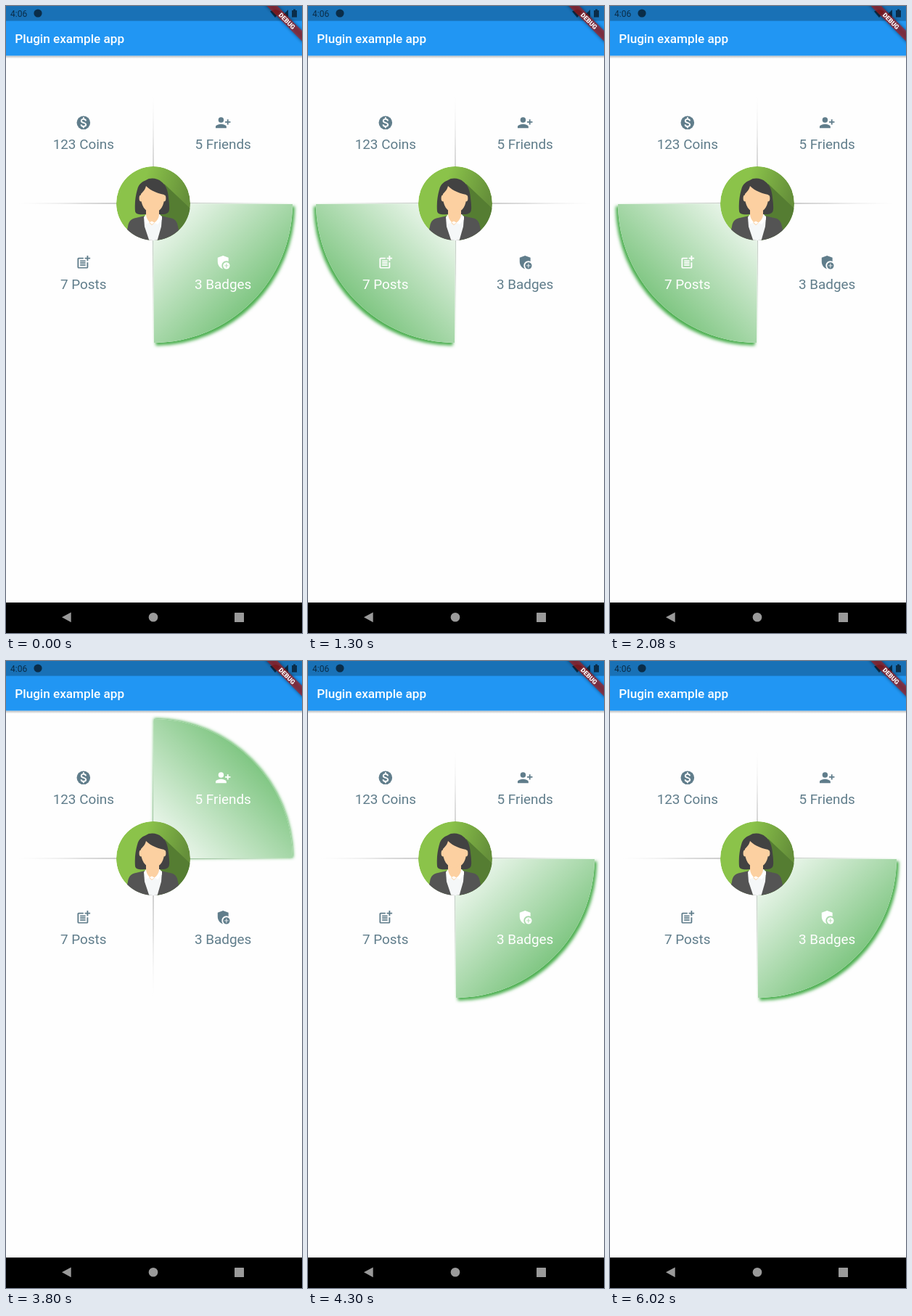
An HTML page for the animation above (7.1 s loop, 408x864 px).

```html
<!DOCTYPE html>
<html lang="en">
<head>
<meta charset="utf-8">
<title>Plugin example app</title>
<style>
html, body { margin: 0; width: 100%; height: 100%; overflow: hidden; background: #fefefe; }
svg { display: block; width: 100%; height: 100%; font-family: Roboto, sans-serif; }
.tile { color: #607d8b; fill: currentColor; font-size: 18.86px; text-anchor: middle; }
.tile.on { color: #fff; }
.wedge { display: none; }
.wedge.on { display: inline; }
</style>
</head>
<body>
<svg viewBox="0 0 408 864">
  <defs>
    <linearGradient id="fade"><stop stop-color="#c4c4c4"/><stop offset=".5" stop-color="#d8d8d8"/><stop offset="1" stop-color="#e8e8e8" stop-opacity="0"/></linearGradient>
    <linearGradient id="green" x2="1" y2="1"><stop stop-color="#fff"/><stop offset="1" stop-color="#4caf50"/></linearGradient>
    <linearGradient id="drop" x2="0" y2="1"><stop stop-color="#000" stop-opacity=".26"/><stop offset="1" stop-color="#000" stop-opacity="0"/></linearGradient>
    <linearGradient id="disc" y2=".3"><stop offset=".4" stop-color="#8bc34a"/><stop offset="1" stop-color="#658f3a"/></linearGradient>
    <filter id="blur" x="-10%" y="-10%" width="120%" height="120%"><feGaussianBlur stdDeviation="1.9"/></filter>
    <filter id="soft" x="-20%" y="-60%" width="140%" height="220%"><feGaussianBlur stdDeviation="2.2"/></filter>
    <clipPath id="round"><circle cx="203" cy="272" r="51"/></clipPath>
    <mask id="dollar">
      <rect width="24" height="24" fill="#fff"/>
      <path d="M15.5 9.3c-.2-1.7-1.4-2.6-3.4-2.6-2 0-3.3 1-3.3 2.5 0 3.8 6.8 2 6.8 5.8 0 1.6-1.3 2.5-3.4 2.5-2.3 0-3.6-1-3.7-2.9M12.1 4v2.7M12.1 17.4V20" fill="none" stroke="#000" stroke-width="2.1"/>
    </mask>
  </defs>

  <g id="lines"></g>
  <g id="wedges"></g>
  <g id="tiles"></g>

  <g clip-path="url(#round)">
    <circle cx="203" cy="272" r="51" fill="url(#disc)"/>
    <path d="M218 245L256 281V325H200Z" fill="#557d32"/>
    <path d="M178 283C177 270 179 260 181 253C183 244 189 242 193 240C198 236 209 237 214 242C222 248 223 256 224 264C225 273 226 280 224 284C221 288 215 287 210 287H192C184 288 179 287 178 283Z" fill="#424242"/>
    <path d="M163 325L168 304C169 296 173 293 179 292L192 289H213L226 292C233 293 236 297 237 304L242 325Z" fill="#545454"/>
    <path d="M193 287L190 291L191 304L198 325H208L214 304L215 291L212 287Z" fill="#f5f7f8"/>
    <path d="M193 278H211V288C210 295 205 299 201 302C196 298 193 294 193 288Z" fill="#fcd0a1"/>
    <path d="M191 290L192 301L201 296.5L209 301L215 294V290L212 288C211 294 206 298 201 301C197 297 194 294 193 288Z" fill="#fff"/>
    <ellipse cx="186" cy="265" rx="2.4" ry="4.4" fill="#fcd0a1"/>
    <ellipse cx="218" cy="265" rx="2.4" ry="4.4" fill="#fcd0a1"/>
    <path d="M186 259C189 256 192 253 193 248C200 255 209 258 218 260C219 272 215 284 202 285C190 284 185 272 186 259Z" fill="#fcd0a1"/>
  </g>

  <rect y="68.5" width="408" height="4" fill="url(#drop)"/>
  <rect width="408" height="68.5" fill="#2196f3"/>
  <rect width="408" height="20.5" fill="#1971b6"/>
  <text x="12.3" y="50.5" font-size="17.14" font-weight="500" fill="#fff">Plugin example app</text>
  <g fill="#0a2d49">
    <text x="6" y="14.6" font-size="12">4:06</text>
    <circle cx="44" cy="10" r="5.6"/>
    <path d="M364 7.5Q371 2.5 378 7.5L371 16Z"/>
    <path d="M389 5V15H379Z"/>
    <path d="M394 6H396V4.6H399V6H401V15.5H394Z"/>
  </g>
  <g transform="translate(408 0) rotate(45)">
    <rect x="-40" y="24" width="80" height="10.3" opacity=".5" filter="url(#soft)"/>
    <rect x="-40" y="24" width="80" height="10.3" fill="#b71c1c" fill-opacity=".63"/>
    <text y="32.3" font-size="8.74" font-weight="900" fill="#fff" text-anchor="middle">DEBUG</text>
  </g>

  <rect y="822" width="408" height="42"/>
  <g fill="#9a9a9a">
    <path d="M77 842.3L89.7 835.5V849.2Z"/>
    <circle cx="203" cy="842.3" r="6.3"/>
    <rect x="315" y="836" width="13" height="13" rx=".6"/>
  </g>
</svg>
<script>
const byId = id => document.getElementById(id);
const R = 192;

// sx, sy: side of the centre on which each quarter lies
const quarters = [
  { sx: 1, sy: 1, label: "3 Badges",
    icon: '<path d="M17 10c1.08 0 2.09.25 3 .68V5l-8-3-8 3v6.09c0 5.05 3.41 9.76 8 10.91l.08-.02C10.8 20.71 10 18.95 10 17c0-3.87 3.13-7 7-7z"/><path d="M17 12a5 5 0 1 0 0 10 5 5 0 0 0 0-10zm3 5.5h-2.5V20h-1v-2.5H14v-1h2.5V14h1v2.5H20z"/>' },
  { sx: -1, sy: 1, label: "7 Posts",
    icon: '<path d="M17 19.2H5V7h7V5H5a2 2 0 0 0-2 2v12a2 2 0 0 0 2 2h12a2 2 0 0 0 2-2v-7h-2zM17 2h2v3h3v2h-3v3h-2V7h-3V5h3zM7 9h8v2H7zM7 12h8v2H7zM7 15h8v2H7z"/>' },
  { sx: -1, sy: -1, label: "123 Coins",
    icon: '<circle cx="12" cy="12" r="10" mask="url(#dollar)"/>' },
  { sx: 1, sy: -1, label: "5 Friends",
    icon: '<circle cx="9" cy="8" r="4"/><path d="M15 10v2h3v3h2v-3h3v-2h-3V7h-2v3zM1 18v2h16v-2c0-2.66-5.33-4-8-4s-8 1.34-8 4z"/>' }
];

byId("lines").innerHTML = [[0, 190], [90, 192], [180, 188], [270, 150]].map(([angle, length]) =>
  `<path d="M0-1.2L${length}-.4V.4L0 1.2Z" fill="url(#fade)" transform="translate(203 272) rotate(${angle})"/>`).join("");

byId("wedges").innerHTML = quarters.map(({ sx, sy }) => {
  const shape = `<path d="M0 0L${R} 1A${R} ${R} 0 0 1 1 ${R}Z"`;
  const shift = sy > 0 ? "translate(2.8 3.4)" : "translate(.5 .5)";
  return `<g class="wedge" transform="translate(203 272) scale(${sx} ${sy})">
    <g filter="url(#blur)" transform="${shift}">${shape} fill="#4caf50" stroke="#4caf50"/></g>
    ${shape} fill="#fff"/>${shape} fill="url(#green)"/></g>`;
}).join("");

byId("tiles").innerHTML = quarters.map(({ sx, sy, label, icon }) => {
  const x = 203 + 96.2 * sx, y = 257 + 96.2 * sy;
  return `<g class="tile"><g transform="translate(${x} ${y}) scale(.93) translate(-12 -12)">${icon}</g>
    <text x="${x}" y="${y + 36.3}">${label}</text></g>`;
}).join("");

const wedges = [...byId("wedges").children];
const tiles = [...byId("tiles").children];
const switches = [1300, 2600, 3800, 4300];

function draw(now) {
  const t = now % 7100;
  const active = switches.filter(s => t >= s).length % 4;
  for (const set of [wedges, tiles]) set.forEach((el, i) => el.classList.toggle("on", i === active));
}

const start = performance.now();
function tick() {
  draw(performance.now() - start);
  requestAnimationFrame(tick);
}
tick();
</script>
</body>
</html>
```
